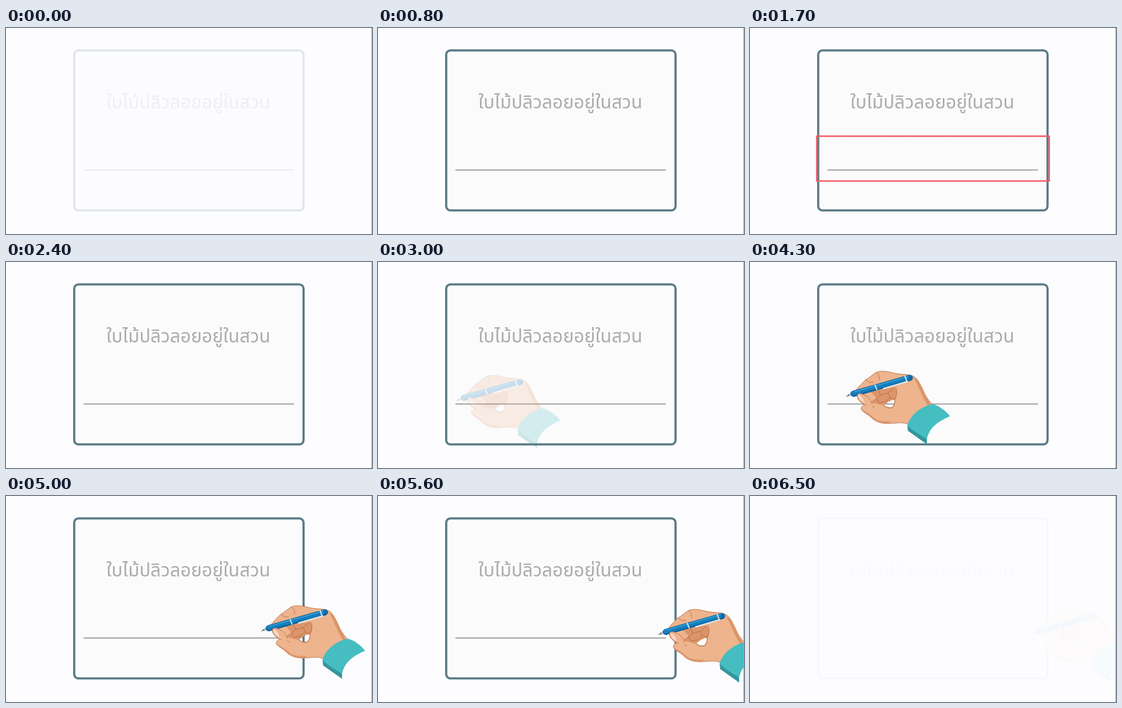
Animation, 600 px wide and 338 px high, one loop 6.6 s. Source, as an HTML page:

```html
<!DOCTYPE html>
<html lang="th">
<head>
<meta charset="utf-8">
<title>Writing card</title>
<style>
html, body { margin: 0; width: 100%; height: 100%; overflow: hidden; background: #fdfdff; }
svg { display: block; width: 600px; height: 338px; }
#phrase { fill: #acabae; text-anchor: middle; }
#strokes { fill: none; stroke: #acabae; stroke-width: 2.5; stroke-linecap: round; stroke-linejoin: round; }
.skin { fill: #edb48d; stroke: #c1794f; stroke-width: 1; stroke-linejoin: round; }
.shade { fill: #db956a; }
.crease { fill: none; stroke: #b56d45; stroke-width: .9; stroke-linecap: round; }
</style>
</head>
<body>
<svg viewBox="0 0 600 338">
  <g id="scene">
    <rect x="111.8" y="36.8" width="376" height="262.4" rx="7" fill="#fbfbfc" stroke="#5b7b86" stroke-width="3.6"/>
    <text id="phrase" x="299" y="132">ใบไม้ปลิวลอยอยู่ในสวน</text>
    <g id="strokes"></g>
    <path d="M127 233H472" stroke="#a9a7aa" stroke-width="2"/>
    <g id="focus" fill="none">
      <rect x="109.5" y="177.5" width="381" height="73.5" stroke="#f8707c" stroke-width="2.4"/>
      <rect x="109.5" y="177.5" width="381" height="73.5" stroke="#ea3343" stroke-width="1.6" stroke-dasharray="1.5 1.5"/>
    </g>
    <g id="hand">
      <!-- palm and wrist -->
      <path class="skin" fill-rule="evenodd" d="M173 211C178 205 184 198 190 193C197 189 200 185 207 181C214 178 223 179 231 181C241 184 251 184 260 185C268 186 274 190 278 199C283 211 290 225 301 236L262 267C249 261 239 265 226 265C213 265 205 261 198 254C193 250 187 247 183 243C180 238 186 236 187 233C180 230 175 224 176 218ZM219 235C224 231 229 226 237 225C239 230 236 236 232 239C227 239 222 238 219 235Z"/>
      <path class="shade" d="M268 190C276 201 281 220 293 238L297 235C288 222 284 205 276 195ZM183 242C191 246 199 251 206 258C214 262 223 262 233 261L228 265C213 266 203 261 197 254Z"/>
      <!-- curled fingers -->
      <path class="shade" d="M198 213L237 205C241 210 242 218 239 225C232 225 225 230 219 235C212 234 205 231 198 231L208 224Z"/>
      <path class="crease" d="M198 231L207 224L214 218L226 215M207 224L211 231L222 229L230 222L237 225M214 218L211 211M226 215L230 222M226 215L236 207M190 193C194 197 197 198 202 197M207 181C211 184 213 188 212 193M237 225C241 220 242 212 239 206M187 233C194 236 199 234 204 239M219 235C224 239 228 240 233 239C238 234 238 229 237 225"/>
      <!-- pen -->
      <path d="M157 221L166 213L170 219Z" fill="#b9c0c6"/>
      <path d="M157 221L162 217L163 219.5Z" fill="#67737d"/>
      <g fill="none" stroke-linecap="round">
        <path d="M170 216L262 190" stroke="#0e5f9b" stroke-width="10"/>
        <path d="M169.5 215.2L261.5 189.2" stroke="#147fbe" stroke-width="7"/>
        <path d="M171 213L259 188" stroke="#46a9dc" stroke-width="1.2"/>
        <path d="M205 202L208 209M254 187L257 195" stroke="#d5e3ec" stroke-width="2"/>
        <path d="M219 207.5L258 196" stroke="#e2ebf1" stroke-width="2.2"/>
      </g>
      <circle cx="263" cy="190" r="3" fill="#0b6aa8"/>
      <!-- thumb -->
      <path class="skin" d="M176 218C179 214 184 216 189 219C195 222 199 227 200 233C197 237 191 236 187 233C181 230 176 225 176 218Z"/>
      <path d="M177 218C181 217 186 224 188 231C182 229 177 224 177 218Z" fill="#f8d6cb"/>
      <path d="M196 227C199 231 201 235 200 240L190 236Z" fill="#edb48d"/>
      <!-- cuff -->
      <path d="M258 267L290 289V299L259 277Z" fill="#34959c"/>
      <path d="M258 268C262 252 280 237 299 233C309 235 321 244 328 253C309 261 294 271 290 291C280 284 266 277 258 268Z" fill="#45bdc1"/>
    </g>
  </g>
  <path d="M599.5 0V338" stroke="#a8a8ac"/>
</svg>
<script>
const $ = id => document.getElementById(id);
const clamp = v => Math.max(0, Math.min(1, v));

// Size the phrase to the card; draw it with pen strokes when no Thai font exists.
function setPhrase() {
  const family = 'Sarabun, "Noto Sans Thai Looped", Garuda, Loma, Waree, "Noto Sans Thai", "Noto Sans", sans-serif';
  const ctx = document.createElement('canvas').getContext('2d');
  ctx.font = '100px ' + family;
  const width = s => ctx.measureText(s).width;
  const text = $('phrase');
  if (Math.abs(width('ม') - width('ใ')) > 1) {
    text.style.fontFamily = family;
    text.style.fontSize = 26900 / width(text.textContent) + 'px';
    return;
  }
  text.style.opacity = 0;
  const loop = (x, y) => `M${x - 2} ${y}a2 2 0 1 0 4 0a2 2 0 1 0 -4 0`;
  const head = loop(3, -17.5);
  const lo = 'M1 -15Q3 -20 8 -20Q14 -20 14 -13V0M14 -9Q8 -14 4 -9Q2 -6 3 -4' + loop(5, -2.5);
  const glyphs = {
    'ใ': 'M4 -3V-17Q9 -20 8 -25Q6 -29 2 -26' + loop(6, -2.5),
    'ไ': 'M4 -3V-21Q4 -25 1 -25L-1 -28L8 -27' + loop(6, -2.5),
    'บ': head + 'M5 -17V0H15V-20',
    'ป': head + 'M5 -17V0H15V-27',
    'ม': head + 'M5 -17V-3Q10 -5 16 0V-20' + loop(3, -2),
    'น': head + 'M5 -17V0Q8 -6 13 -3V-20' + loop(14.5, -2.5),
    'ล': lo,
    'ส': lo + 'M11 -18L15 -22',
    'ว': 'M1 -16Q2 -20 6 -20Q11 -20 11 -14V-4' + loop(9, -2.5),
    'อ': 'M1 -16Q3 -20 7 -20Q13 -20 13 -13V0H2V-9' + loop(4, -9),
    'ย': head + 'M3 -15Q2 -12 6 -10.5Q2 -9 2 -5V0H13V-20',
    '้': 'M0 -25Q3 -29 3 -26Q1 -23 6 -24L9 -29',
    'ิ': 'M0 -23Q6 -30 11 -23Z',
    'ู': 'M0 4Q3 3 3 8H8V3',
    '่': 'M0 -24V-29'
  };
  const left = [167, 177, 196, 205, 213, 225, 242, 245, 259, 274, 291, 307, 324, 340, 345, 352, 357, 367, 386, 402, 416];
  $('strokes').innerHTML = [...text.textContent].map((c, i) =>
    `<path transform="translate(${left[i]} 132)" d="${glyphs[c]}"/>`).join('');
}

const easeInOut = u => u < .5 ? 4 * u ** 3 : 1 - 4 * (1 - u) ** 3;

function draw(now) {
  const t = Math.floor(now % 6600 / 100) * 100;
  $('scene').style.opacity = Math.min(clamp((t + 100) / 600), clamp(1 - (t - 5700) / 830));
  $('focus').style.opacity = Math.min(clamp((t - 1300) / 300), clamp((2000 - t) / 200));
  $('hand').style.opacity = clamp((t - 2900) / 500) ** .95;

  // The hand crosses the line in nine small hops.
  const p = easeInOut(clamp((t - 3818) / 1724));
  const hops = 9 * p - .9 * p * p * (1 - p);
  const lift = 17 * Math.sin(Math.PI * hops) ** 2;
  $('hand').setAttribute('transform', `translate(${331 * p - 29} ${7 - lift})`);
}

function tick() {
  draw(performance.now() - start);
  requestAnimationFrame(tick);
}

setPhrase();
const start = performance.now();
tick();
</script>
</body>
</html>
```
